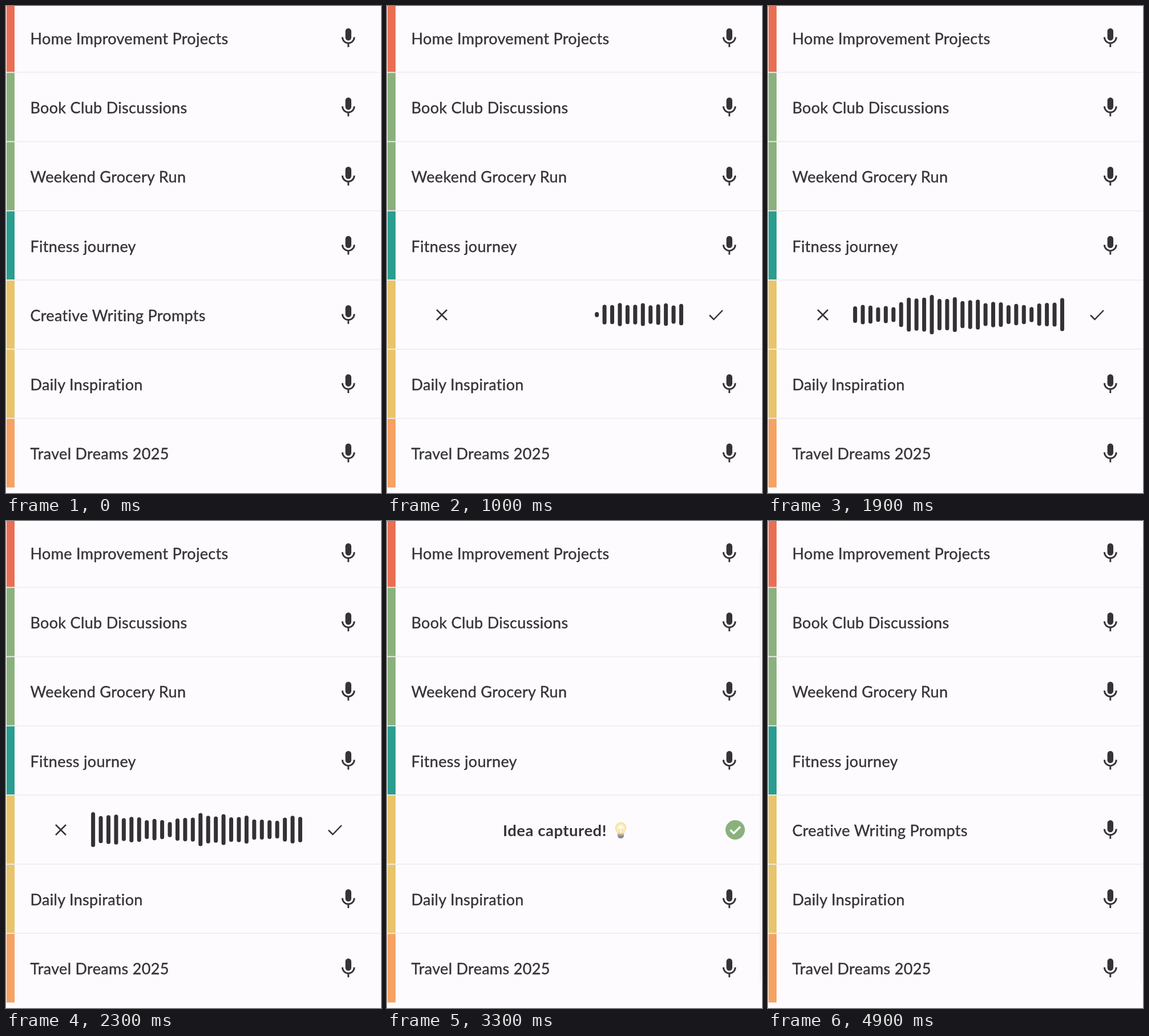
An HTML page for the animation above (5 s loop, 657x853 px).

```html
<!DOCTYPE html>
<html lang="en">
<head>
<meta charset="utf-8">
<title>Voice notes list</title>
<style>
  html, body { margin: 0; width: 100%; height: 100%; overflow: hidden; background: #fdfbfd; }
  svg { display: block; width: 100vw; height: 100vh; }
  text { font: 400 27px Lato, "Open Sans", sans-serif; letter-spacing: .32px; fill: #363438; stroke: #363438; stroke-width: .4px; }
  .bold { font-weight: 700; font-size: 27.5px; letter-spacing: .5px; stroke: none; }
  .line { fill: none; stroke: #353336; stroke-width: 2.5; }
  .bars line { stroke: #333135; stroke-width: 7; stroke-linecap: round; }
</style>
</head>
<body>
<svg viewBox="0 0 657 853">
  <defs>
    <g id="mic">
      <rect x="-5.2" y="-16.5" width="10.4" height="21.4" rx="5.2" fill="#353336"/>
      <path class="line" style="stroke-width:2.9" d="M-10.4 -1a10.4 10.4 0 0 0 20.8 0M0 9.4V16.4"/>
    </g>
    <radialGradient id="glow">
      <stop offset=".3" stop-color="#fffbe6"/>
      <stop offset="1" stop-color="#f6e29a"/>
    </radialGradient>
  </defs>
  <g id="rows"></g>
  <path id="edge" d="M654 48V808" stroke="#f3f1f3" stroke-width="2"/>
  <g id="record">
    <circle id="press" cx="576" cy="541" r="16" fill="#f1eff2"/>
    <path class="line" d="M87 532l18 18M105 532l-18 18"/>
    <path class="line" d="M565 541.5l7.5 7.5L588 533"/>
    <g id="bars" class="bars"></g>
  </g>
  <g id="done">
    <text class="bold" x="203" y="552">Idea captured!</text>
    <path d="M404 544h11v8q-1 4-5.500 4t-5.500-4z" fill="#8d8b8c"/>
    <path d="M404.500 550h10" stroke="#bdbbbc" stroke-width="1.500"/>
    <path d="M404 548q0-3-2.500-6a9.300 9.300 0 1 1 16 0q-2.500 3-2.500 6z" fill="url(#glow)" stroke="#efd98f" stroke-width=".8"/>
    <path d="M407 547l-1-8 3.500 2 3.500-2-1 8" fill="none" stroke="#ead9a0"/>
    <circle cx="610" cy="541" r="17" fill="#8ab17d"/>
    <path d="M601.500 541l6 6L619 535.500" fill="none" stroke="#fff" stroke-width="3.200"/>
  </g>
  <circle id="touch" r="25" fill="#9b999a"/>
</svg>
<script>
const LOOP = 5000, PITCH = 121.2, TOP = -5, ACTIVE = 4;
const ROWS = [
  ["Home Improvement Projects", "#e96f53"],
  ["Book Club Discussions", "#8ab17d"],
  ["Weekend Grocery Run", "#8ab17d"],
  ["Fitness journey", "#2a9d8f"],
  ["Creative Writing Prompts", "#e9c46a"],
  ["Daily Inspiration", "#e9c46a"],
  ["Travel Dreams 2025", "#f5a262"]
];

// The moments that drive everything, in ms
const TAP_MIC = 250, OPEN = 400, TAP_CHECK = 2700, SAVED = 2850, CLOSE = 4450;
const FADE = 100;

const SLOTS = 28, BAR_X = 152.6, BAR_STEP = 13.44, BAR_Y = 540.5;
const FIRST_BAR = 610, BARS_PER_MS = .032, DOT = 4;

// Swells of the voice: [bar number, half height]
const SWELLS = [
  [0, DOT], [1, 18], [11, 18], [18, 13], [19, 24], [22, 32], [29, 24],
  [36, 15], [40, 26], [46, 22], [49, 15], [54, 28], [60, DOT]
];

const $ = id => document.getElementById(id);
const clamp = v => Math.min(1, Math.max(0, v));

function add(parent, tag, attrs, label) {
  const el = document.createElementNS("http://www.w3.org/2000/svg", tag);
  for (const key in attrs) el.setAttribute(key, attrs[key]);
  if (label) el.textContent = label;
  return parent.appendChild(el);
}

// Fades in after `from` and out after `to`
const shown = (t, from, to) => clamp((t - from) / FADE) - clamp((t - to) / FADE);

function level(n) {
  const i = SWELLS.findIndex(([at]) => at > n);
  if (i < 0) return DOT;
  const [n0, h0] = SWELLS[i - 1], [n1, h1] = SWELLS[i];
  const swell = h0 + (h1 - h0) * (n - n0) / (n1 - n0);
  return Math.max(DOT, swell * (1 + .12 * Math.cos(2.2 * (n - 3))));
}

ROWS.forEach(([name, color], i) => {
  const y = TOP + i * PITCH, rows = $("rows");
  add(rows, "rect", { x: 1, y, width: 14, height: PITCH, fill: color });
  if (i) add(rows, "rect", { x: 1, y: y - .8, width: 655, height: 1.8, fill: "#efedef" });
  const item = add(rows, "g", i === ACTIVE ? { id: "item" } : {});
  add(item, "text", { x: 42.5, y: y + 72 }, name);
  add(item, "use", { href: "#mic", x: 599.8, y: y + 60.6 });
});

const bars = Array.from({ length: SLOTS }, (_, i) => {
  const x = BAR_X + i * BAR_STEP;
  return add($("bars"), "line", { x1: x, x2: x });
});

function drawBars(t) {
  const count = Math.floor((t - FIRST_BAR) * BARS_PER_MS);
  bars.forEach((bar, i) => {
    const n = count - SLOTS + i;
    bar.style.display = n < 0 ? "none" : "";
    if (n < 0) return;
    const half = level(n) - 3.5;
    bar.setAttribute("y1", BAR_Y - half);
    bar.setAttribute("y2", BAR_Y + half);
  });
}

function drawTouch(t) {
  const first = t < OPEN + FADE;
  const tap = first ? TAP_MIC : TAP_CHECK;
  $("touch").setAttribute("cx", first ? 614 : 600.7);
  $("touch").setAttribute("cy", first ? 541 : 505);
  $("touch").style.opacity = shown(t, tap - 150, tap + 50);
}

function draw(t) {
  $("item").style.opacity = 1 - shown(t, OPEN - FADE / 2, CLOSE);
  $("record").style.opacity = shown(t, OPEN, SAVED);
  $("press").style.opacity = shown(t, TAP_CHECK - 150, SAVED);
  $("done").style.opacity = shown(t, SAVED + FADE / 2, CLOSE - FADE / 2);
  $("edge").style.opacity = shown(t, TAP_CHECK - 200, LOOP);
  drawBars(t);
  drawTouch(t);
}

const start = performance.now();
function tick() {
  draw((performance.now() - start) % LOOP);
  requestAnimationFrame(tick);
}
tick();
</script>
</body>
</html>
```
